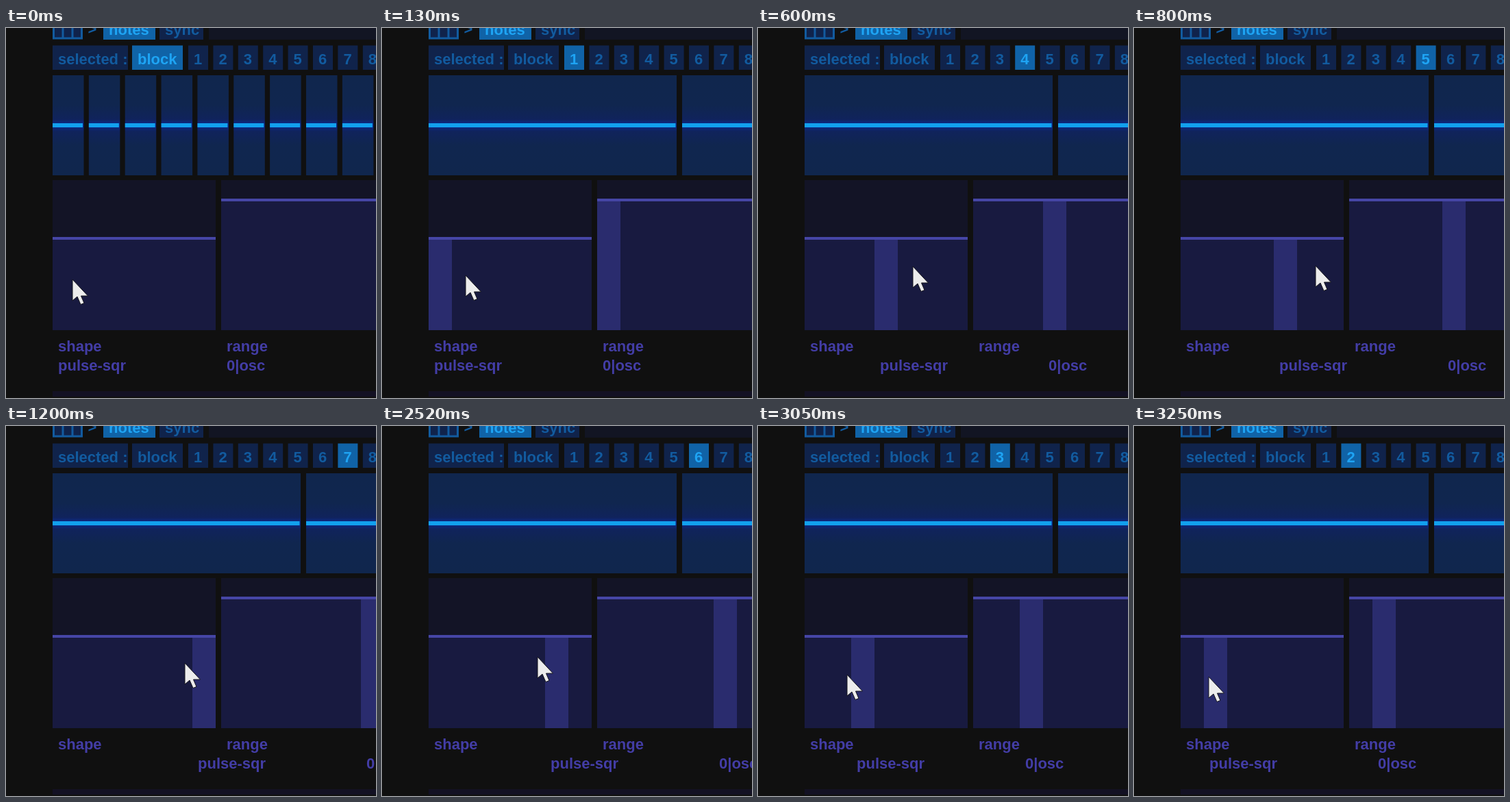
These frames come from a looping animation (540 px wide and 540 px high, 4.11 s). An HTML page:

```html
<!DOCTYPE html>
<html lang="en">
<head>
<meta charset="utf-8">
<title>Block selector</title>
<style>
  html, body { margin: 0; width: 100%; height: 100%; overflow: hidden; background: #101010; }
  svg { display: block; width: 100%; height: 100%; }
  text { font: bold 22px "Liberation Sans", Arial, sans-serif; white-space: pre; }
  .tab rect { fill: #10234b; }
  .tab text { fill: #125b9f; }
  .tab.on rect { fill: #1063a7; }
  .tab.on text { fill: #1ea4f4; }
  .label { fill: #433da6; }
</style>
</head>
<body>
<svg id="stage" viewBox="0 0 540 540">
  <defs>
    <linearGradient id="wave" x1="0" y1="0" x2="0" y2="1">
      <stop offset="0" stop-color="#10264d"/>
      <stop offset=".3" stop-color="#10264f"/>
      <stop offset=".44" stop-color="#10235c"/>
      <stop offset=".5" stop-color="#0b2a90"/>
      <stop offset=".56" stop-color="#10235c"/>
      <stop offset=".7" stop-color="#10264f"/>
      <stop offset="1" stop-color="#10264d"/>
    </linearGradient>
  </defs>
</svg>
<script>
const NS = "http://www.w3.org/2000/svg";
const stage = document.getElementById("stage");
const LOOP = 4110;
const STEP = 34;

// start time, selected item (0 = block), pointer x and y
const poses = [
  [0, 0, 97, 367], [130, 1, 122, 361], [460, 2, 165, 354], [530, 3, 196, 350],
  [600, 4, 226, 348], [800, 5, 265, 347], [1000, 6, 272, 347], [1200, 7, 261, 346],
  [2520, 6, 227, 337], [2650, 5, 185, 348], [2850, 4, 151, 358],
  [3050, 3, 130, 363], [3250, 2, 109, 366]
];

function add(tag, attrs, parent = stage) {
  const node = document.createElementNS(NS, tag);
  for (const key in attrs) node.setAttribute(key, attrs[key]);
  return parent.appendChild(node);
}

const box = (x, y, width, height, fill, parent) =>
  add("rect", { x, y, width, height, fill }, parent);

function write(x, y, string, attrs = {}, parent) {
  const node = add("text", { x, y, ...attrs }, parent);
  node.textContent = string;
  return node;
}

function tab(x, y, width, height, baseline, string, on = false) {
  const group = add("g", { class: on ? "tab on" : "tab" });
  add("rect", { x, y, width, height }, group);
  write(x + 8, baseline, string, {}, group);
  return group;
}

function wavePanel(x, width, parent) {
  box(x, 69, width, 146, "url(#wave)", parent);
  box(x, 139, width - 1.5, 6, "#12a0ee", parent);
}

function slider(x, level, name, value) {
  box(x, 222, 238, 219, "#131426");
  box(x, level, 238, 441 - level, "#181a40");
  const bar = box(x, level, STEP, 441 - level, "#2a2c6e");
  box(x, level - 2, 238, 4, "#4646a6");
  write(x + 8, 472, name, { class: "label" });
  return { bar, value: write(x + 8, 500, value, { class: "label" }) };
}

// top row
add("path", {
  d: "M69.5 -10V15H110.5V-10M83 -10V15M97 -10V15",
  fill: "#10234b", stroke: "#125b9f", "stroke-width": 3
});
write(119.5, 9, ">", { fill: "#125b9f" });
tab(142, -20, 76, 37, 10, "notes", true);
tab(224, -20, 64, 37, 10, "sync");
box(296, -20, 260, 37, "#121523");

// selector row
tab(68, 25.5, 110, 35.5, 53, "selected :");
const tabs = [tab(184, 25.5, 74, 35.5, 53, "block")];
for (let n = 1; n <= 8; n++) {
  tabs.push(tab(266 + (n - 1) * 36.4, 25.5, 29, 35.5, 53, String(n)));
}

// waveforms, split into blocks or joined
const split = add("g", {});
for (let i = 0; i < 9; i++) wavePanel(68 + i * 370 / 7, 45.5, split);
const joined = add("g", {});
wavePanel(68, 362, joined);
wavePanel(438, 362, joined);

const sliders = [
  slider(68, 307, "shape", "pulse-sqr"),
  slider(314, 251, "range", "0|osc")
];
box(68, 530, 472, 8, "#131123");

const pointer = add("path", {
  d: "M0 0V31L7 25L12 36.5L17 34.5L12.5 24H22.5Z",
  fill: "#ececec", stroke: "#15151c", "stroke-width": 1
});

function show([, item, x, y]) {
  tabs.forEach((node, i) => node.classList.toggle("on", i === item));
  split.style.display = item ? "none" : "";
  joined.style.display = item ? "" : "none";
  const shift = `translate(${Math.max(0, item - 1) * STEP} 0)`;
  for (const { bar, value } of sliders) {
    bar.style.display = item ? "" : "none";
    bar.setAttribute("transform", shift);
    value.setAttribute("transform", shift);
  }
  pointer.setAttribute("transform", `translate(${x} ${y})`);
}

let current;
const start = performance.now();
function tick() {
  const time = (performance.now() - start) % LOOP;
  const pose = poses.findLast(([from]) => from <= time);
  if (pose !== current) show(current = pose);
  requestAnimationFrame(tick);
}
tick();
</script>
</body>
</html>
```
